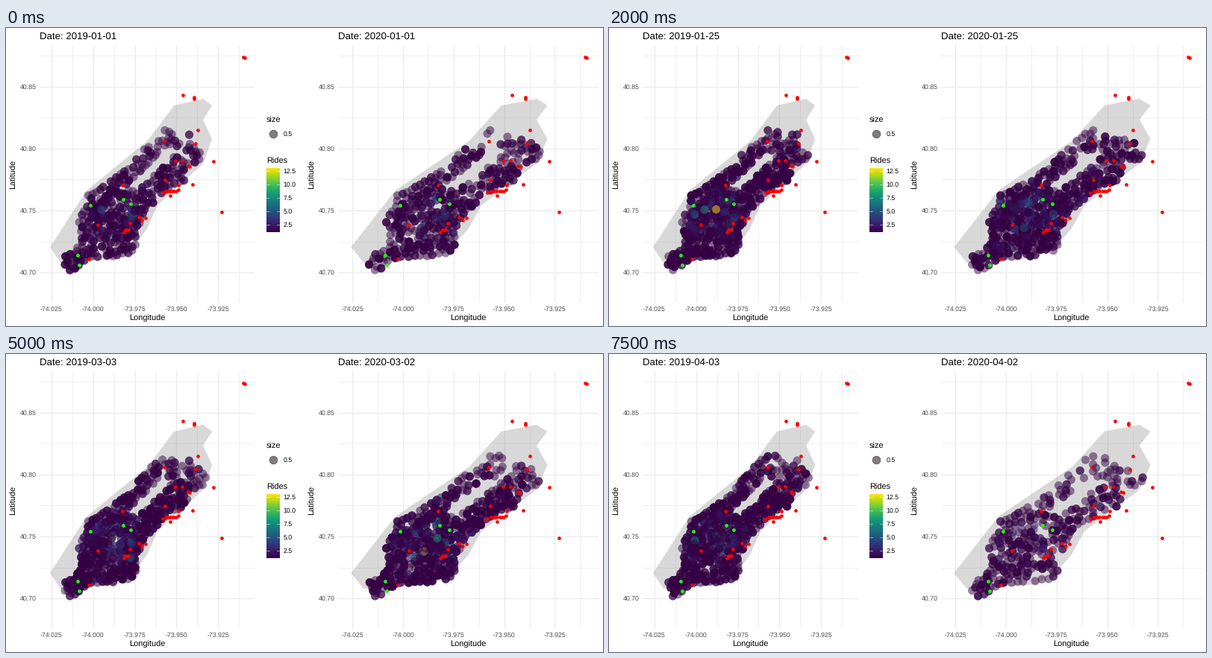
A matplotlib script that plays this animation: 800x400 px, repeating every 8 s.

```python
import numpy as np
import matplotlib.pyplot as plt
from matplotlib.animation import FuncAnimation
from matplotlib.colors import ListedColormap
from matplotlib.path import Path

plt.rcParams["font.family"] = "Liberation Sans"
plt.rcParams["text.hinting"] = "none"

W, H, DPI = 800, 400, 100
FRAMES, STEP_MS = 16, 500
PX = 72 / DPI                      # points per pixel
TOP, BOTTOM = 23, 368
GREY = "#4d4d4d"

# Viridis, slightly deepened
deep = ListedColormap(plt.get_cmap("viridis")(np.linspace(0, 1, 256)) ** 1.2)

# Outlines in the pixel space of the left panel
ISLAND = [(59, 294), (108, 218), (190, 151), (225, 104), (264, 95), (276, 104),
          (264, 123), (276, 149), (264, 182), (203, 238), (189, 269), (174, 290),
          (150, 309), (73, 315)]
SERVICE = [(77, 321), (80, 304), (92, 299), (102, 286), (97, 262), (110, 224),
           (130, 213), (162, 190), (185, 161), (208, 138), (222, 136), (238, 150),
           (250, 139), (260, 156), (272, 167), (262, 178), (246, 186), (238, 207),
           (222, 210), (188, 245), (173, 275), (175, 292), (164, 304), (110, 311),
           (88, 326)]
PARK = [(159, 214), (177, 219), (229, 168), (211, 163)]

# Landmarks: single sites plus a riverside row and a downtown cluster
RED = [(318, 39), (319.5, 39.6), (237, 90), (252, 93), (252, 95), (257, 137),
       (253.5, 155), (278, 178.5), (211.5, 152), (227, 177.5), (235.5, 177.5),
       (243.5, 185), (245.5, 185.7), (213, 204), (231, 210.5), (249.5, 209.5),
       (210, 220.5), (230.5, 216.5), (220, 225), (155.5, 211), (123, 264),
       (178, 254), (182, 257.5), (186.5, 254.5), (165.5, 261.5), (157.5, 274),
       (288.5, 247), (111, 310)]
RED += [(x, 219) for x in np.linspace(214, 228, 6)]
RED += [(x, 271) for x in (160, 162, 163.5)]
GREEN = [(157.2, 229.5), (167.3, 236), (113, 237.5), (96.3, 304.5), (98, 318)]


def make_stations(gap=4.4):
    """Scatter evenly spaced stations over the service area, outside the park."""
    rng = np.random.default_rng(12)
    darts = rng.uniform((75, 135), (273, 328), (20000, 2))
    ok = Path(SERVICE).contains_points(darts) & ~Path(PARK).contains_points(darts)
    pts = np.empty((0, 2))
    for p in darts[ok]:
        if np.all(np.hypot(*(pts - p).T) > gap):
            pts = np.vstack([pts, p])
    x, y = pts.T
    busy = np.interp(y, [150, 180, 215], [0.85, 1.7, 2.7])
    core = np.exp(-((x - 145) / 45) ** 2 - ((y - 246) / 34) ** 2)
    warm = 0.2 + core * rng.gamma(2, 0.6, len(pts))
    return pts, busy, warm


STATIONS, BUSY, WARM = make_stations()


def smooth(t):
    t = np.clip(t, 0, 1)
    return t * t * (3 - 2 * t)


def activity(year, day):
    """Quiet New Year's Day, then steady riding; spring 2020 falls away."""
    level = 1 - 0.4 * np.exp(-day / 2)
    if year == 2020:
        level *= 1 - 0.55 * smooth((day - 60) / 25)
    return level


def label(x, y, s, size, color="black", **kw):
    return ax.text(x, y, s, fontsize=size * PX, color=color, **kw)


def dots(pts, radius, color, z):
    return ax.scatter(*np.transpose(pts), s=(2 * radius * PX) ** 2, c=color,
                      linewidths=0, zorder=z)


class Panel:
    def __init__(self, year, left, right, zero, scale):
        self.year, self.zero, self.scale = year, zero, scale
        self.grid(left, right)
        ax.add_patch(plt.Polygon(self.place(ISLAND), fc="#7f7f7f", alpha=0.3,
                                 lw=0, zorder=2))
        self.rides = dots([(0, 0)], 5.6, "none", 3)
        dots(self.place(RED), 2.35, "#ff0000", 4)
        dots(self.place(GREEN), 2.4, "#1fff0f", 5)
        self.title = label(left, 15, "", 13.2)
        label((left + right) / 2, 393, "Longitude", 11, ha="center")
        label(left - 35, 196, "Latitude", 11, rotation=90,
              ha="center", va="center")

    def place(self, pts):
        pts = np.array(pts, float)
        pts[:, 0] = self.zero + (pts[:, 0] - 116.5) * self.scale
        return pts

    def grid(self, left, right):
        def rule(xs, ys, major):
            ax.plot(xs, ys, color="#ebebeb", lw=(1.4 if major else 0.75) * PX,
                    solid_capstyle="butt", zorder=1)

        for i in range(-2, 8):
            x, major = self.zero + i * 27.95 * self.scale, i % 2 == 0
            rule((x, x), (TOP, BOTTOM), major)
            if major:
                label(x, 380, f"{-74 + i * 0.0125:.3f}", 8.8, GREY, ha="center")
        for i in range(8):
            y, major = 328.2 - i * 41.6, i % 2 == 0
            rule((left, right), (y, y), major)
            if major:
                label(left - 4.5, y + 3.2, f"{40.7 + i * 0.025:.2f}", 8.8, GREY,
                      ha="right")

    def update(self, k):
        day = max(0, round(6.15 * k - 0.2))
        date = np.datetime64(f"{self.year}-01-01") + day
        self.title.set_text(f"Date: {date}")

        rng = np.random.default_rng(self.year * 100 + k)
        level = activity(self.year, day)
        trips = rng.poisson(BUSY * level)
        who = rng.permutation(np.repeat(np.arange(len(trips)), trips))
        rides = 1 + np.floor(rng.exponential(WARM[who] * level))
        self.rides.set_offsets(self.place(STATIONS[who]))
        self.rides.set_facecolors(deep((rides - 1) / 12, alpha=0.5))


def draw_legend():
    label(349, 127, "size", 11)
    ax.scatter(357.7, 141.7, s=(10.6 * PX) ** 2, c="#817b7f",
               edgecolors="#5a5558", linewidths=0.8 * PX)
    label(371.5, 145, "0.5", 8.8)
    label(349, 182, "Rides", 11)
    ax.imshow(np.linspace(1, 0, 256)[:, None], cmap=deep, aspect="auto",
              extent=(349, 366.3, 274, 188), zorder=2)
    for i in range(1, 6):
        y = 282 - 18 * i
        for x in (349, 362.8):
            ax.plot((x, x + 3.5), (y, y), color="white", lw=0.5 * PX, zorder=3)
        label(371.5, y + 3.2, f"{2.5 * i:.1f}", 8.8)


fig = plt.figure(figsize=(W / DPI, H / DPI), dpi=DPI, facecolor="white")
ax = fig.add_axes([0, 0, 1, 1])
draw_legend()
panels = [Panel(2019, 45, 333, 116.6, 1),
          Panel(2020, 445, 794, 532.1, 1.2125)]
ax.set(xlim=(0, W), ylim=(H, 0))
ax.axis("off")


def update(k):
    for panel in panels:
        panel.update(k)


anim = FuncAnimation(fig, update, frames=FRAMES, interval=STEP_MS,
                     repeat=True, repeat_delay=0)
plt.show()
```
